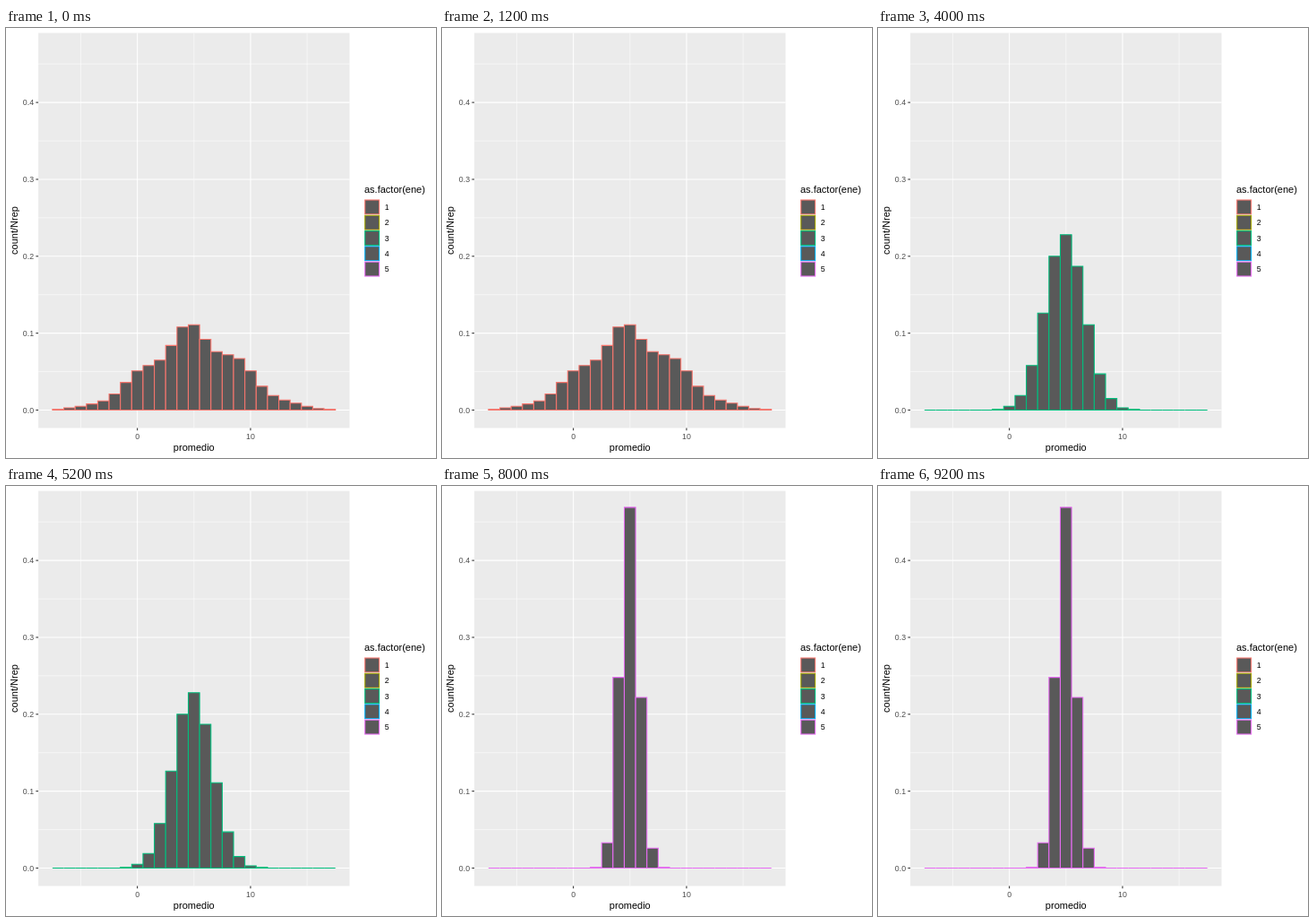
An HTML page for the animation above (10 s loop, 480 px wide and 480 px high).

```html
<!DOCTYPE html>
<html lang="es">
<head>
<meta charset="utf-8">
<style>
html, body { margin: 0; width: 100%; height: 100%; overflow: hidden; background: #fff }
svg { display: block }
text { font: 11px "Liberation Sans", Arial, sans-serif }
.tick, .key { font-size: 8.8px }
.tick { fill: #4d4d4d }
.bar { fill: #595959; stroke-width: 1.07 }
</style>
</head>
<body>
<svg id="plot" width="480" height="480" viewBox="0 0 480 480"></svg>
<script>
const HOLD = 2000;
// Each sample is a normal curve; the widest ones carry a slight sampling ripple
const samples = [
  { color: '#F8766D', mean: 5, sd: 4, ripple: .14, crest: 4.5 },
  { color: '#A3A500', mean: 5, sd: 2.83, ripple: .1, crest: 6.6 },
  { color: '#00BF7D', mean: 4.9, sd: 1.75 },
  { color: '#00B0F6', mean: 4.95, sd: 1.28 },
  { color: '#E76BF3', mean: 4.96, sd: .85 }
];
const panel = { left: 36.1, right: 383.5, top: 5.5, bottom: 446.5 };
const binWidth = (panel.right - panel.left) / 27.5;
const X = v => panel.left + (v + 8.75) * binWidth;
const Y = v => 426.5 - v * 858.5;

const rect = (x, y, w, h, attrs) => `<rect x="${x}" y="${y}" width="${w}" height="${h}" ${attrs}/>`;
const line = (x1, y1, x2, y2, color, width) =>
  `<path d="M${x1} ${y1}L${x2} ${y2}" stroke="${color}" stroke-width="${width}"/>`;
const text = (x, y, s, attrs = '') => `<text x="${x}" y="${y}" ${attrs}>${s}</text>`;
const vertical = (v, w) => line(X(v), panel.top, X(v), panel.bottom, '#fff', w);
const horizontal = (v, w) => line(panel.left, Y(v), panel.right, Y(v), '#fff', w);

function axes() {
  const { left, right, top, bottom } = panel;
  let out = rect(left, top, right - left, bottom - top, 'fill="#ebebeb"');
  for (let v = -5; v <= 15; v += 10) out += vertical(v, .53);
  for (let i = 0; i < 5; i++) out += horizontal(i / 10 + .05, .53);
  for (let v = 0; v <= 10; v += 10) {
    out += vertical(v, 1.07) + line(X(v), bottom, X(v), bottom + 2.75, '#333', 1.07)
      + text(X(v), 459, v, 'class="tick" text-anchor="middle"');
  }
  for (let i = 0; i < 5; i++) {
    const y = Y(i / 10);
    out += horizontal(i / 10, 1.07) + line(left - 2.75, y, left, y, '#333', 1.07)
      + text(31.1, y + 3.15, (i / 10).toFixed(1), 'class="tick" text-anchor="end"');
  }
  return out + text((left + right) / 2, 472, 'promedio', 'text-anchor="middle"')
    + text(0, 0, 'count/Nrep', 'text-anchor="middle" transform="translate(13.4 226) rotate(-90)"');
}

function legend() {
  const size = 17.28, inset = .71;
  let out = text(400, 184, 'as.factor(ene)');
  samples.forEach(({ color }, i) => {
    const y = 191.3 + i * size, inner = size - 2 * inset;
    out += rect(400, y, size, size, 'fill="#f2f2f2"')
      + rect(400 + inset, y + inset, inner, inner, `class="bar" stroke="${color}"`)
      + text(422.8, y + 11.8, i + 1, 'class="key"');
  });
  return out;
}

function share(v, { mean, sd, ripple = 0, crest = 0 }) {
  const curve = Math.exp(-(((v - mean) / sd) ** 2) / 2) / (sd * Math.sqrt(2 * Math.PI));
  const wave = 1 + ripple * Math.cos(2 * Math.PI * (v - crest) / 5);
  return Math.round(1000 * curve * wave) / 1000;
}

function histogram(sample) {
  let out = '';
  for (let v = -7; v <= 17; v++) {
    const y = Y(share(v, sample)), h = Y(0) - y;
    out += `<path class="bar" stroke="${sample.color}" d="M${X(v - .5)} ${y}h${binWidth}v${h}h${-binWidth}z"/>`;
  }
  return out;
}

document.getElementById('plot').innerHTML = axes() + legend() + '<g id="bars"></g>';
const barGroup = document.getElementById('bars');
let shown = -1;
function draw() {
  const i = Math.floor(performance.now() / HOLD) % samples.length;
  if (i !== shown) barGroup.innerHTML = histogram(samples[shown = i]);
  requestAnimationFrame(draw);
}
draw();
</script>
</body>
</html>
```
